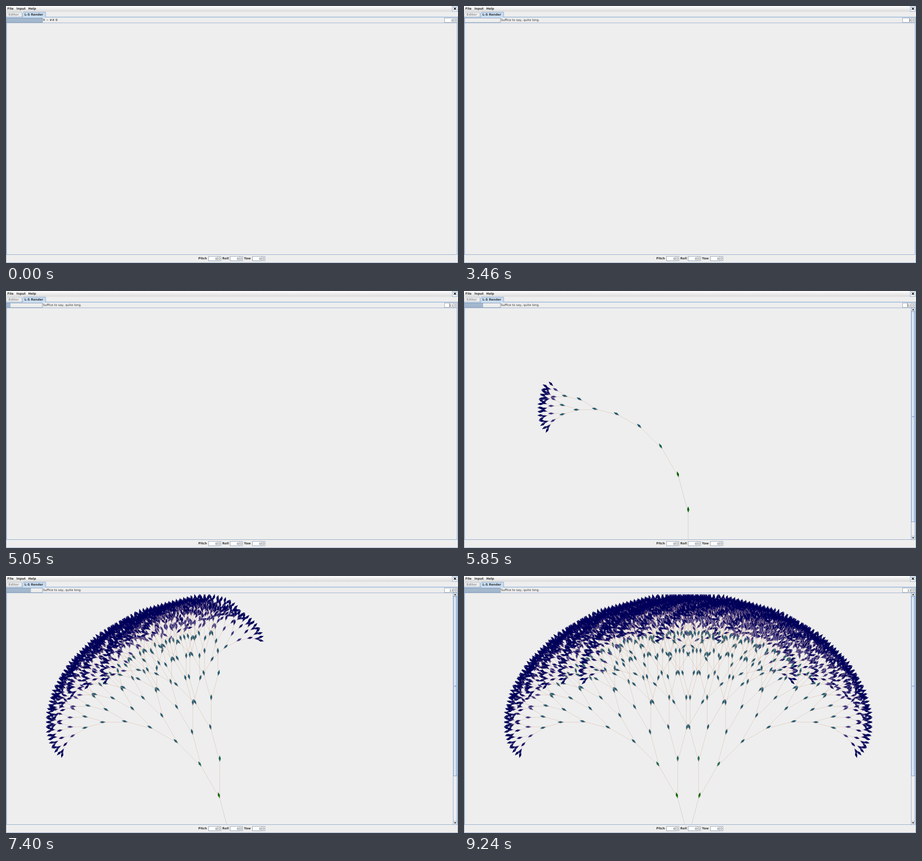
Recreate the animation shown at these times as an HTML page with a canvas. Size 992 by 565 pixels, loop 9680 ms.

```html
<!DOCTYPE html>
<html lang="en">
<head>
<meta charset="utf-8">
<title>L-system render</title>
<style>
  html, body { margin: 0; width: 100%; height: 100%; overflow: hidden; background: #eee; }
  svg, canvas { position: absolute; left: 0; top: 0; }
  canvas { top: 38px; }
  text { font: 6.67px "DejaVu Sans", sans-serif; fill: #333; white-space: pre; }
  .bold { font-weight: bold; }
  .end { text-anchor: end; }
</style>
</head>
<body>
<canvas id="view" width="992" height="508"></canvas>
<svg id="ui" width="992" height="565" viewBox="0 0 992 565">
  <defs>
    <linearGradient id="menu" x2="0" y2="1"><stop stop-color="#fff"/><stop offset="1" stop-color="#dadada"/></linearGradient>
    <linearGradient id="thumbFill"><stop stop-color="#f0f5fa"/><stop offset="1" stop-color="#b8cfe5"/></linearGradient>
  </defs>
</svg>
<script>
const LOOP = 9680;
const BLUE = '#7a9ac4', GREY = '#8a9aaa';
const UNIT = 8.05, TURN = Math.PI / 12, LEAF = 14;
const ui = document.getElementById('ui');
const ctx = document.getElementById('view').getContext('2d');

function add(tag, attrs, parent = ui) {
  const el = document.createElementNS('http://www.w3.org/2000/svg', tag);
  for (const name in attrs) el.setAttribute(name, attrs[name]);
  return parent.appendChild(el);
}
function box(x, y, width, height, fill, stroke = 'none', parent = ui) {
  return add('rect', { x, y, width, height, fill, stroke, 'stroke-width': .8 }, parent);
}
function line(d, stroke = BLUE, width = 1, parent = ui) {
  return add('path', { d, stroke, 'stroke-width': width, fill: 'none' }, parent);
}
function label(x, y, content, cls = '', fill = '#333') {
  const el = add('text', { x, y, class: cls, style: `fill:${fill}` });
  el.textContent = content;
  return el;
}
function spinner(x, y) {
  box(x + .5, y + .5, 27.3, 9.5, '#eee', GREY);
  box(x + .5, y + .5, 20, 9.5, '#fff', GREY);
  line(`M${x + 20.5} ${y + 5.2}h7.3`, GREY, .8);
  add('path', { d: `M${x + 23} ${y + 3.6}h2.6l-1.3-1.4zM${x + 23} ${y + 6.9}h2.6l-1.3 1.4z`, fill: '#555' });
  return label(x + 19.6, y + 7.5, '0', 'end');
}

// Window chrome
box(0, 0, 992, 12.5, 'url(#menu)');
[['File', 3], ['Input', 23], ['Help', 49]].forEach(([s, x]) => label(x, 8, s, 'bold'));
box(979.5, .5, 11.5, 11.5, '#f6f9fc', BLUE);
line('M982.7 3.3l5.2 5.2m0-5.2l-5.2 5.2', '#111', 1.6);
line('M.9 24V16l2-2H34.5V24', '#a3b0bd', .8);
label(5.6, 21, 'Editor', 'bold', '#999');
box(0, 24, 992, 1.8, '#c8ddf2');
add('path', { d: 'M36.5 25V15.5l2-2H87V25', fill: '#c8ddf2', stroke: BLUE, 'stroke-width': .8 });
label(40.6, 21, 'L-S Render', 'bold');
line('M0 24.2H36.5M87 24.2H992', BLUE, .8);
line('M.5 24V564.5H991.5V24', BLUE, .8);
box(1.3, 37, 988.5, 509.4, 'none', BLUE);

const barFill = box(2, 26.4, 78, 9.8, '#a3b8cc');
box(1.3, 26.4, 78.6, 9.8, 'none', '#6f89ab');
const info = label(81, 33.2, '');
const count = spinner(962, 26);
const caret = box(977, 27, .8, 8, '#555');
[['Pitch', 422, 444], ['Roll', 474.7, 491.5], ['Yaw', 522.3, 540.5]].forEach(([s, x, at]) => {
  label(x, 557.4, s, 'bold');
  spinner(at, 550);
});

const scroll = add('g', {});
box(981.5, 37.5, 8.3, 508.7, '#eee', BLUE, scroll);
const thumb = box(982, 45, 7.6, 394, 'url(#thumbFill)', '#6382bf', scroll);
line('M981.5 45h8.5M981.5 539h8.5', BLUE, .7, scroll);
add('path', { d: 'M983.2 42.3h5l-2.5-3zM983.2 541.5h5l-2.5 3z', fill: '#111' }, scroll);
const grip = line('M983.6 0h4.4m-4.4 1.6h4.4', '#6382bf', .7, scroll);

// Depth-first list of branches, left side first
function grow(order) {
  const cos = Math.cos(TURN);
  let height = LEAF;
  for (let k = order - 1, i = 0; k > 0; k--, i++) height += UNIT * k * (i % 2 ? cos : 1);
  const tall = order > 11;
  const branches = [];
  (function branch(x, y, angle, k, depth) {
    if (k < 1) return;
    const dx = -Math.sin(angle), dy = -Math.cos(angle);
    const nx = x + dx * k * UNIT, ny = y + dy * k * UNIT;
    branches.push({ x, y, nx, ny, dx, dy, depth });
    branch(nx, ny, angle + TURN, k - 1, depth + 1);
    branch(nx, ny, angle - TURN, k - 1, depth + 1);
  })(tall ? 492 : 496, tall ? 39.1 + height : 291.8 + height / 2, 0, order - 1, 0);
  return branches;
}
const trees = Array.from({ length: 14 }, (_, n) => grow(n));

const leafColor = d => d < 2 ? '#006400' : d < 3 ? '#176653' : d < 8 ? '#1e566e' : d < 9 ? '#32307a' : '#00005a';
const stemColor = d => d < 2 ? '#bdb5b1' : d < 9 ? '#d8b49f' : '#d4b0b4';

function paint(order, shown) {
  ctx.setTransform(1, 0, 0, 1, 0, 0);
  ctx.clearRect(0, 0, 992, 508);
  ctx.translate(0, -38);
  ctx.lineWidth = .55;
  for (const b of trees[order].slice(0, shown)) {
    ctx.strokeStyle = stemColor(b.depth);
    ctx.beginPath();
    ctx.moveTo(b.x, b.y);
    ctx.lineTo(b.nx, b.ny);
    ctx.stroke();
    const mx = b.nx + b.dx * LEAF / 2, my = b.ny + b.dy * LEAF / 2, w = 2.6;
    ctx.fillStyle = leafColor(b.depth);
    ctx.beginPath();
    ctx.moveTo(b.nx, b.ny);
    ctx.lineTo(mx - b.dy * w, my + b.dx * w);
    ctx.lineTo(b.nx + b.dx * LEAF, b.ny + b.dy * LEAF);
    ctx.lineTo(mx + b.dy * w, my - b.dx * w);
    ctx.fill();
  }
}

// Steps: time, order, progress bar, drawn part
const steps = [[0, 0, 1, 0], [2770, 1, 1, 0], [3140, 2, 0, 0], [3220, 2, 1, 1]];
for (let n = 3; n < 9; n++) {
  const t = 3460 + 182 * (n - 3);
  steps.push([t, n, 0, 0], [t + 70, n, 1, 1]);
}
// Drawing fills the second half of the bar; the part runs linearly between two moments
function draw(order, times, [t0, p0], [t1, p1]) {
  for (const t of times) {
    const part = p0 + (p1 - p0) * (t - t0) / (t1 - t0);
    steps.push([t, order, .5 + part / 2, part]);
  }
}
steps.push([4550, 9, 0, 0], [4640, 9, 1, 1], [4730, 10, .1, 0]);
draw(10, [4820, 4910], [4730, 0], [4910, 1]);
steps.push([5000, 11, .1, 0]);
draw(11, [5090, 5180, 5290], [5050, 0], [5290, 1]);
steps.push([5400, 12, .5, 0]);
draw(12, [5760, 5850], [5740, 0], [5850, .025]);
draw(12, [5970, 6070, 6170, 6270, 6360, 6460], [5850, .025], [6460, 1]);
steps.push([6650, 13, .18, 0]);
draw(13, [6880, 7010, 7140, 7270, 7400], [6770, 0], [7400, .35]);
draw(13, [7530, 7640, 7750, 7860, 7970, 8080, 8180, 8290, 8390], [7400, .35], [8390, 1]);

const blinks = [620, 1110, 1600, 2100, 2600, 5970, 6460, 7270, 7640, 8180, 8700, 9240];
const notes = ['R ~ ## B', 'R ~ ## F [ + B ] [ - B ]', 'R ~ ## F F [ + F [ + B ] [ - B ] ] [ - F [ + B ] [ - B ] ]'];

let current;
function show(step) {
  const [, order, bar, part] = step;
  barFill.setAttribute('width', 78 * bar);
  info.textContent = notes[order] || 'Suffice to say, quite long.';
  count.textContent = order;
  caret.setAttribute('x', order > 9 ? 973 : 977);
  const bottom = order === 12 ? 507.5 : 439.5;
  scroll.style.display = order > 11 && part > 0 ? '' : 'none';
  thumb.setAttribute('height', bottom - 45);
  grip.setAttribute('transform', `translate(0 ${(bottom + 45) / 2 - .8})`);
  paint(order, Math.round(part * trees[order].length));
}
function frame() {
  const t = performance.now() % LOOP;
  const step = steps.findLast(s => s[0] <= t);
  if (step !== current) show(current = step);
  caret.style.display = blinks.filter(b => b <= t).length % 2 ? '' : 'none';
  requestAnimationFrame(frame);
}
frame();
</script>
</body>
</html>
```
